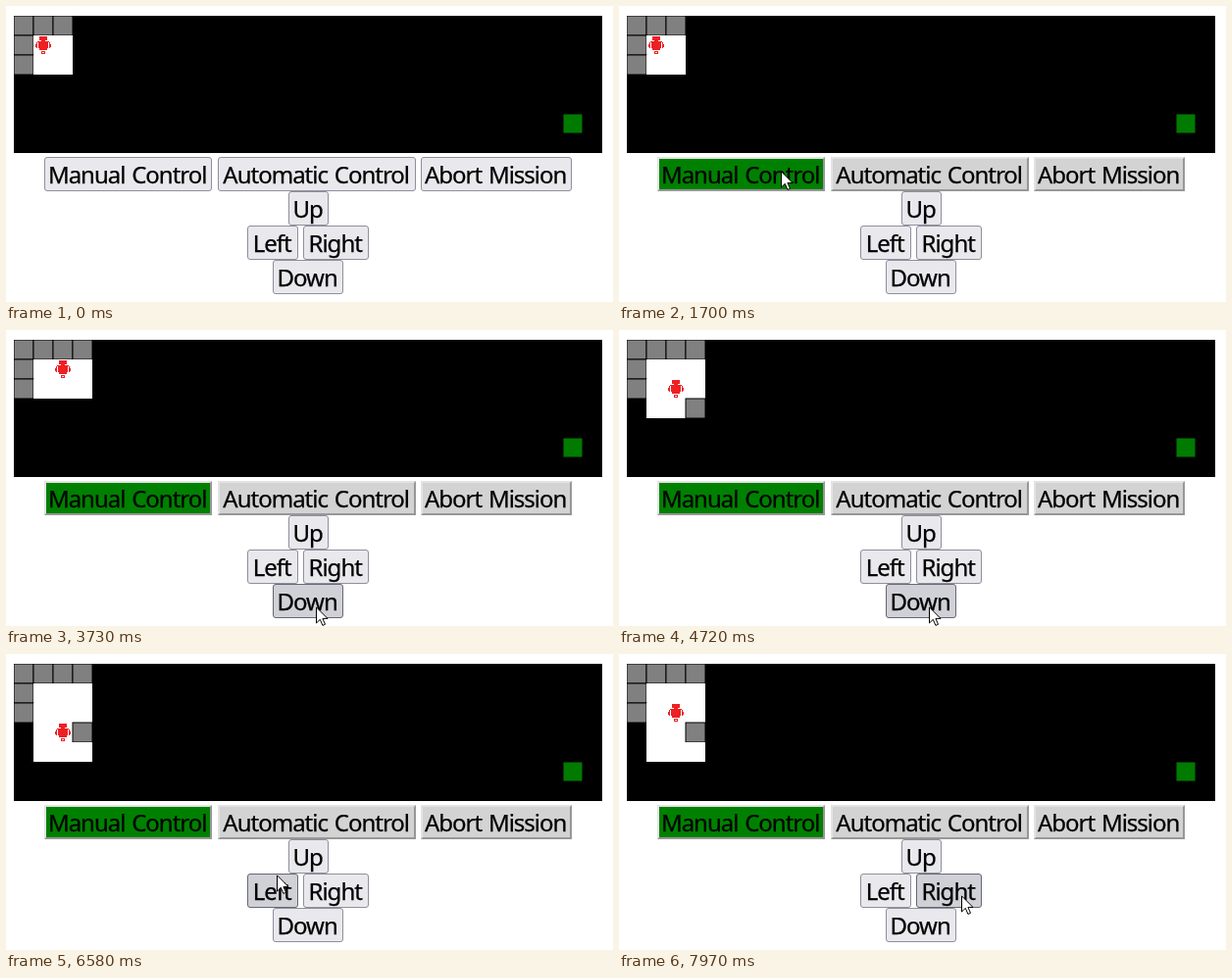
Write an HTML page that moves like this. It is 619 px wide and 302 px high and loops after 8 s.

```html
<!DOCTYPE html>
<html lang="en">
<head>
<meta charset="utf-8">
<title>Robot control panel</title>
<style>
  html, body { margin: 0; width: 100%; height: 100%; overflow: hidden; background: #fff; }
  svg { display: block; width: 619px; height: 302px; }
  text {
    font: 24px "Noto Sans", "Open Sans", sans-serif;
    letter-spacing: -1px; word-spacing: 1.5px; text-anchor: middle;
    stroke: #000; stroke-width: .25px;
  }
</style>
</head>
<body>
<svg viewBox="0 0 619 302">
  <clipPath id="frame"><rect width="600" height="140"/></clipPath>
  <g transform="translate(8 10)">
    <g id="board" clip-path="url(#frame)"><rect width="600" height="140"/></g>
    <g id="robot" fill="#ed2024" shape-rendering="crispEdges">
      <path d="M6 1h8v4h-8zM8 5h4v1h-4zM4 6h12v1h-12zM5 7h10v6h-10zM6 13h8v2h-8z"/>
      <path d="M3 7h1v2h-1zM2 9h2v3h-2zM3 12h1v1h-1zM16 7h1v2h-1zM16 9h2v3h-2zM16 12h1v1h-1z"/>
      <path fill-rule="evenodd" d="M8 16h4v3h-4zM9 17h2v1h-2z"/>
    </g>
  </g>
  <g id="buttons"></g>
  <path id="cursor" fill="#fff" stroke="#000" d="M.5.9v16.1l3.8-3.7 2.6 6.1 2.6-1.1-2.6-5.9h5.1z"/>
</svg>
<script>
const LOOP = 8000;
const SVG = "http://www.w3.org/2000/svg";
const $ = id => document.getElementById(id);

function set(node, attrs) {
  for (const key in attrs) node.setAttribute(key, attrs[key]);
}
function add(parent, tag, attrs) {
  const node = document.createElementNS(SVG, tag);
  set(node, attrs);
  return parent.appendChild(node);
}
const show = (node, on) => set(node, { visibility: on ? "visible" : "hidden" });

// Board: cells are painted in reading order, so floor covers the wall outlines before it.
const CELL = 20;
const MAP = ["####", "#...", "#...", "#..#", "#..."];
const drawCell = (col, row, look) => add($("board"), "rect", {
  x: col * CELL, y: row * CELL, width: CELL, height: CELL, ...look
});
const cells = MAP.flatMap((line, row) => [...line].map((kind, col) => ({
  col, row,
  node: drawCell(col, row, kind === "#" ? { fill: "#808080", stroke: "#000" } : { fill: "#fff" })
})));
drawCell(28, 5, { fill: "#007b00", stroke: "#000" });

const HOME = { col: 1, row: 1 };
const moves = [
  { at: 3730, dir: "right" },
  { at: 4720, dir: "down" },
  { at: 5750, dir: "down" },
  { at: 7580, dir: "up" }
];
const STEP = { right: [1, 0], down: [0, 1], up: [0, -1] };

function visitedBy(t) {
  const path = [HOME];
  for (const { at, dir } of moves) {
    if (t < at) break;
    const { col, row } = path[path.length - 1];
    path.push({ col: col + STEP[dir][0], row: row + STEP[dir][1] });
  }
  return path;
}

// The robot uncovers every cell next to its path.
function renderBoard(t) {
  const path = visitedBy(t);
  const { col, row } = path[path.length - 1];
  set($("robot"), { transform: `translate(${col * CELL} ${row * CELL})` });
  for (const cell of cells) {
    const near = p => Math.abs(p.col - cell.col) <= 1 && Math.abs(p.row - cell.row) <= 1;
    show(cell.node, path.some(near));
  }
}

// Pointer: eased strokes, sampled at the refresh interval
const SAMPLE = 77;
const ENTRY = { x: 620, y: 238 };
const strokes = [
  { from: 70, to: 460, x: 236, y: 176 },
  { from: 540, to: 610, x: 165, y: 168 },
  { from: 2020, to: 2310, x: 362, y: 251 },
  { from: 2480, to: 2710, x: 334, y: 250 },
  { from: 2940, to: 3090, x: 316, y: 282 },
  { from: 5820, to: 5890, x: 306, y: 273 },
  { from: 6040, to: 6210, x: 273, y: 225 },
  { from: 6580, to: 6970, x: 313, y: 219 },
  { from: 7810, to: 7970, x: 349, y: 246 }
];
const smooth = p => p * p * (3 - 2 * p);

function pointerAt(t) {
  let pos = ENTRY;
  for (const { from, to, x, y } of strokes) {
    if (t < from) break;
    const gaps = Math.round((to - from) / SAMPLE);
    const sample = Math.min(gaps, Math.floor((t - from) / (to - from) * gaps + .01));
    const p = smooth((sample + 1) / (gaps + 1));
    pos = { x: Math.round(pos.x + (x - pos.x) * p), y: Math.round(pos.y + (y - pos.y) * p) };
  }
  return pos;
}

// Buttons: rows centred under the board
const CENTER = 308, TOP = 154, HEIGHT = 35, GAP = 5.5;
const MANUAL_ON = 1700;
const PRESS_TIME = 80;
const presses = [1540, 2790, 4020, 5030, 7120];
const looks = {
  idle: { fill: "#e9e9ed", stroke: "#8f8f9d" },
  hover: { fill: "#d0d0d7", stroke: "#676774" },
  active: { fill: "#b1b1b9", stroke: "#484851" }
};
const rows = [
  [
    { label: "Manual Control", w: 171, modeFill: "#008000" },
    { label: "Automatic Control", w: 202, modeFill: "#d3d3d3" },
    { label: "Abort Mission", w: 154, modeFill: "#d3d3d3" }
  ],
  [{ label: "Up", w: 41 }],
  [{ label: "Left", w: 52 }, { label: "Right", w: 67 }],
  [{ label: "Down", w: 72 }]
];

function drawBevel(parent, w, fill) {
  const bevel = add(parent, "g", {});
  add(bevel, "rect", { width: w, height: HEIGHT, fill: "#979797" });
  add(bevel, "path", { d: `M0 ${HEIGHT}V0H${w}l-2 2L2 ${HEIGHT - 2}z`, fill: "#e3e3e3" });
  add(bevel, "rect", { x: 2, y: 2, width: w - 4, height: HEIGHT - 4, fill });
  return bevel;
}

const buttons = rows.flatMap((row, index) => {
  const total = row.reduce((sum, b) => sum + b.w + GAP, -GAP);
  let left = CENTER - total / 2;
  return row.map(({ label, w, modeFill }) => {
    const x = Math.round(left), y = TOP + index * HEIGHT;
    left += w + GAP;
    const group = add($("buttons"), "g", { transform: `translate(${x} ${y})` });
    const face = add(group, "rect", { x: .5, y: .5, width: w - 1, height: HEIGHT - 1, rx: 2.5 });
    const bevel = modeFill && drawBevel(group, w, modeFill);
    add(group, "text", { x: w / 2 - .8, y: 27 }).textContent = label;
    return { x, y, w, face, bevel };
  });
});

function renderButtons(t, pointer) {
  const pressed = presses.some(at => t >= at && t < at + PRESS_TIME);
  for (const { x, y, w, face, bevel } of buttons) {
    const over = pointer.x >= x && pointer.x < x + w && pointer.y >= y && pointer.y < y + HEIGHT;
    set(face, looks[over ? (pressed ? "active" : "hover") : "idle"]);
    if (bevel) {
      show(bevel, t >= MANUAL_ON);
      show(face, t < MANUAL_ON);
    }
  }
}

function render(t) {
  const pointer = pointerAt(t);
  set($("cursor"), { transform: `translate(${pointer.x} ${pointer.y})` });
  renderBoard(t);
  renderButtons(t, pointer);
}

const start = performance.now();
function tick() {
  render((performance.now() - start) % LOOP);
  requestAnimationFrame(tick);
}
render(0);
requestAnimationFrame(tick);
</script>
</body>
</html>
```
